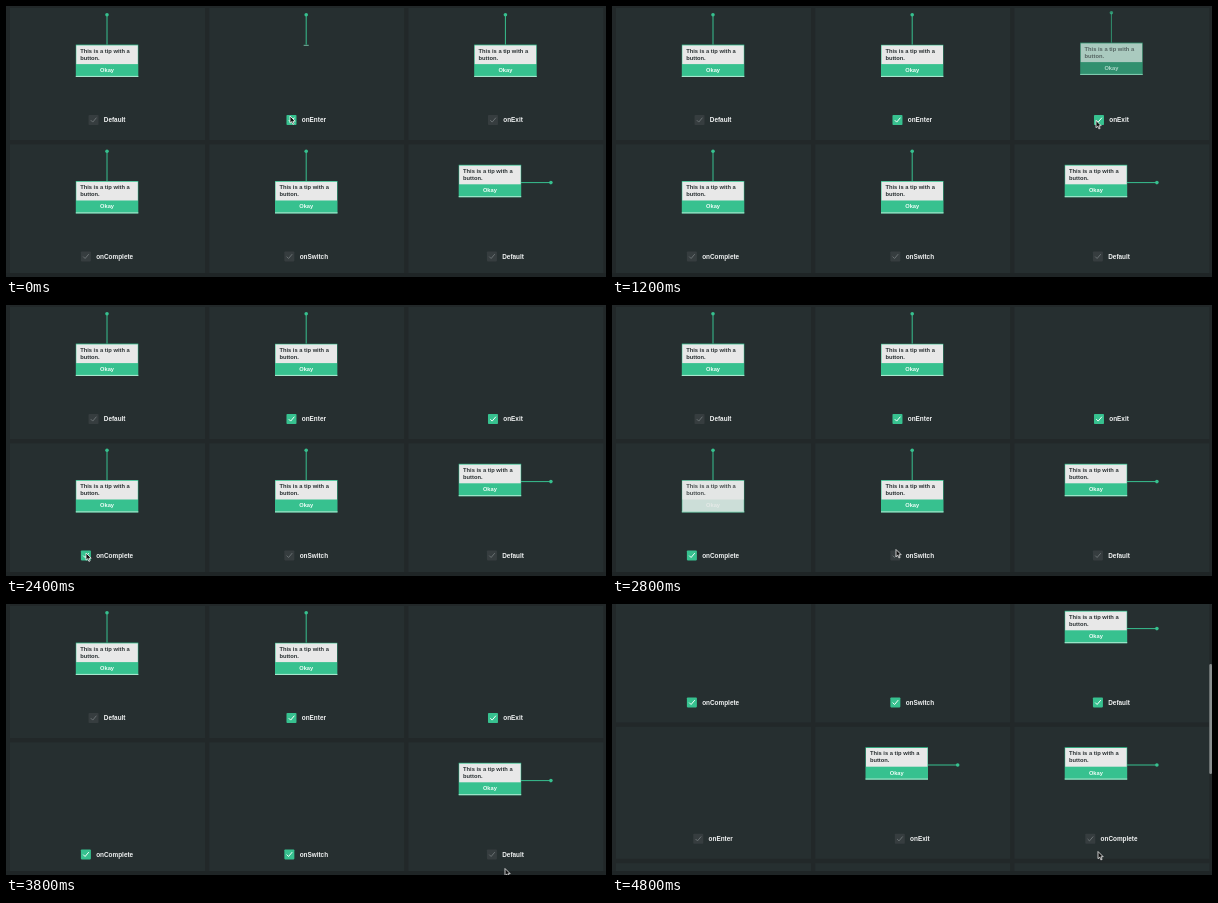
These frames come from a looping animation (600x271 px, 5000 ms). An HTML page with a canvas:

```html
<!DOCTYPE html>
<html lang="en">
<head>
<meta charset="utf-8">
<style>
  html, body { margin: 0; height: 100%; overflow: hidden; background: #222829; }
  canvas { display: block; width: 600px; height: 271px; }
</style>
</head>
<body>
<canvas id="stage"></canvas>
<script>
const LOOP = 5000, STEP = 100;
const GREEN = '#37c18f', PAPER = '#e8e8e8', INK = '#2a3133', FONT = '"Liberation Sans", Arial, sans-serif';
const canvas = document.getElementById('stage');
const ctx = canvas.getContext('2d');
const ratio = window.devicePixelRatio || 1;
canvas.width = 600 * ratio;
canvas.height = 271 * ratio;

// Grid order; side marks a tip whose line leaves to the right.
const cells = [
  { label: 'Default' },
  { label: 'onEnter', checkAt: 0, effect: 'enter' },
  { label: 'onExit', checkAt: 1000, effect: 'exit' },
  { label: 'onComplete', checkAt: 2300, effect: 'complete' },
  { label: 'onSwitch', checkAt: 3000, effect: 'switch' },
  { label: 'Default', checkAt: 4100, side: true },
  { label: 'onEnter', effect: 'hidden' },
  { label: 'onExit', side: true },
  { label: 'onComplete', side: true }
];

const cursorPath = [
  [0, 284, 110], [150, 284, 110], [600, 501, 114], [900, 484, 114.5], [1250, 484, 114.5],
  [1750, 99.5, 241], [1850, 99.5, 241], [2200, 80, 248], [2400, 80, 248],
  [2750, 284, 244.5], [3400, 284, 244.5], [3600, 499, 264.5], [3800, 499, 264.5],
  [4000, 486, 247.5], [5000, 486, 247.5]
];
const scrollPath = [[0, 0], [4400, 0], [4500, 20], [4600, 70], [4700, 120], [4800, 152], [5000, 152]];

const progress = (t, from, to) => Math.min(1, Math.max(0, (t - from) / (to - from)));
const smooth = p => p * p * (3 - 2 * p);

function follow(path, t, ease = p => p) {
  const i = path.findIndex(key => key[0] > t);
  const a = path[i - 1], b = path[i];
  const p = ease(progress(t, a[0], b[0]));
  return a.slice(1).map((v, k) => v + (b[k + 1] - v) * p);
}

function rect(x, y, w, h, color) {
  ctx.fillStyle = color;
  ctx.fillRect(x, y, w, h);
}

function text(string, x, y, size, color, align = 'left') {
  ctx.font = `bold ${size}px ${FONT}`;
  ctx.textAlign = align;
  ctx.fillStyle = color;
  ctx.fillText(string, x, y);
}

function line(points, color, width) {
  ctx.beginPath();
  points.forEach(([x, y]) => ctx.lineTo(x, y));
  ctx.strokeStyle = color;
  ctx.lineWidth = width;
  ctx.stroke();
}

function connector(x1, y1, x2, y2, part = 1) {
  if (part <= 0) return;
  line([[x1, y1], [x1 + (x2 - x1) * part, y1 + (y2 - y1) * part]], GREEN, 1);
  ctx.beginPath();
  ctx.arc(x1, y1, 1.8, 0, 7);
  ctx.fillStyle = GREEN;
  ctx.fill();
}

// Box 62.5 x 32 with its top centre at the origin.
function box(button = 1) {
  rect(-31.2, 0, 62.5, 32.4, GREEN);
  rect(-30.7, 0.8, 61.5, 18.7, PAPER);
  rect(-31.2, 31.3, 62.5, 1.1, '#a5e6cc');
  text('Okay', 0, 27.4, 5.7, '#f2fffa', 'center');
  if (button < 1) {
    ctx.save();
    ctx.globalAlpha *= 1 - button;
    rect(-30.7, 0.8, 61.5, 30.8, PAPER);
    ctx.restore();
  }
  text('This is a tip with a', -26.8, 8, 5.75, INK);
  text('button.', -26.8, 14.9, 5.75, INK);
}

function tip(cell, t) {
  const { effect, side } = cell;
  if (effect === 'hidden') return;
  ctx.save();
  if (side) {
    ctx.translate(-15.5, 22.4);
    connector(61, 17.8, 31, 17.8);
    box();
    ctx.restore();
    return;
  }
  let stem = 1, alpha = 1, button = 1;
  if (effect === 'exit') {
    const p = progress(t, 1050, 1500);
    ctx.globalAlpha = 1 - p;
    ctx.translate(0, -6 * p);
  } else if (effect === 'complete') {
    button = 1 - progress(t, 2450, 2800);
    alpha = 1 - progress(t, 2760, 3020);
    stem = 1 - smooth(progress(t, 2850, 3100));
  } else if (effect === 'switch') {
    alpha = 1 - progress(t, 3000, 3250);
    stem = 1 - progress(t, 3050, 3300);
  }
  connector(0, 8.8, 0, 38.6, stem);
  ctx.translate(0, 38.6);
  if (effect === 'enter') {
    const half = 2.5 + 29 * smooth(progress(t, 0, 250));
    const height = 1 + 32 * smooth(progress(t, 200, 550));
    ctx.beginPath();
    ctx.rect(-half, 0, half * 2, height);
    ctx.clip();
  }
  ctx.globalAlpha *= alpha;
  box(button);
  ctx.restore();
}

function checkbox(cell, t) {
  const on = t >= cell.checkAt;
  ctx.font = `bold 6.4px ${FONT}`;
  const left = -(15.3 + ctx.measureText(cell.label).width) / 2;
  ctx.beginPath();
  ctx.roundRect(left, 109, 10, 10, 0.8);
  ctx.fillStyle = on ? GREEN : '#363d3f';
  ctx.fill();
  line([[left + 2.3, 114.2], [left + 4.2, 116.1], [left + 7.9, 111.7]], on ? '#f4fffb' : '#697072', 1);
  text(cell.label, left + 15.3, 116.4, 6.4, '#f0f2f2');
}

function cursor(x, y) {
  ctx.beginPath();
  [[0, 0], [0, 7.2], [1.7, 5.7], [2.9, 8.4], [4.1, 7.9], [2.9, 5.3], [5.2, 5.2]]
    .forEach(([dx, dy]) => ctx.lineTo(x + dx, y + dy));
  ctx.closePath();
  ctx.fillStyle = '#111';
  ctx.fill();
  ctx.strokeStyle = '#f4f4f4';
  ctx.lineWidth = 0.8;
  ctx.stroke();
}

function draw(t) {
  const [scroll] = follow(scrollPath, t);
  ctx.setTransform(ratio, 0, 0, ratio, 0, 0);
  rect(0, 0, 600, 271, '#222829');
  for (let i = 0; i < 12; i++) {
    ctx.save();
    ctx.translate(101 + (i % 3) * 199.2, Math.floor(i / 3) * 136.4 - scroll);
    rect(-97, 2, 195, 132, '#262f30');
    if (cells[i]) {
      tip(cells[i], t);
      checkbox(cells[i], t);
    }
    ctx.restore();
  }
  rect(0, 267, 600, 4, '#1f2526');
  if (scroll) {
    ctx.beginPath();
    ctx.roundRect(597.3, scroll * 0.402 - 1, 2.7, 110, 1.3);
    ctx.fillStyle = '#888d8e';
    ctx.fill();
  }
  cursor(...follow(cursorPath, t, smooth));
}

function frame() {
  const t = performance.now() % LOOP;
  draw(Math.floor(t / STEP) * STEP);
  requestAnimationFrame(frame);
}
frame();
</script>
</body>
</html>
```
